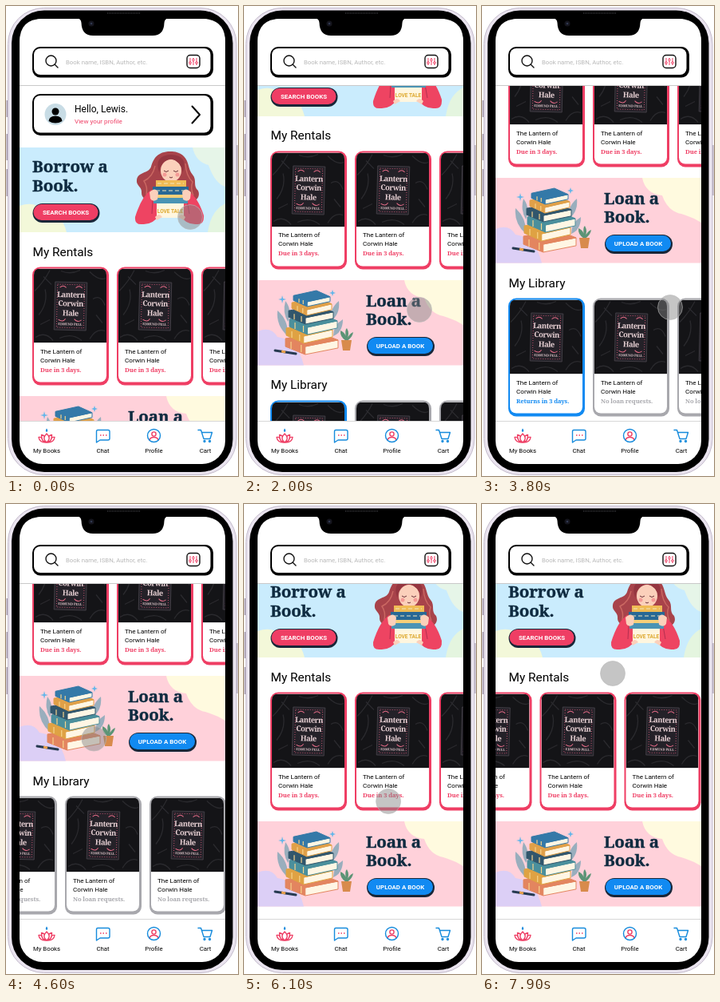
These frames come from a looping animation (291 by 588 pixels, 8 s). An HTML page:

```html
<!DOCTYPE html>
<html lang="en">
<head>
<meta charset="utf-8">
<title>Book rental app</title>
<style>
html, body { margin: 0; width: 100%; height: 100%; overflow: hidden; background: #fff; }
svg { display: block; width: 291px; height: 588px; font-family: Roboto, sans-serif; }
.display { font-family: "Noto Serif", serif; font-weight: 900; }
.title { font-size: 20.5px; fill: #0f2b40; stroke: #0f2b40; stroke-width: .4; letter-spacing: -.1px; }
.head { font-size: 15.4px; }
.small { font-size: 8.1px; }
.due { font-size: 7.6px; letter-spacing: -.1px; }
.button { font-size: 7.9px; font-weight: 700; fill: #fff; text-anchor: middle; }
.nav { font-size: 7.8px; text-anchor: middle; }
.line { fill: none; stroke-width: 1.4; stroke-linecap: round; stroke-linejoin: round; }
</style>
</head>
<body>
<svg viewBox="0 0 291 588">
  <defs>
    <clipPath id="view"><path d="M17 99H275V520H17Z"/></clipPath>
    <clipPath id="photoClip"><path d="M2 95V10Q2 2 10 2H85Q93 2 93 10V95Z"/></clipPath>
    <g id="photo" clip-path="url(#photoClip)">
      <path d="M2 2H93V95H2Z" fill="#141417"/>
      <g fill="none" stroke="#55545a" stroke-width="1.3" opacity=".35">
        <path d="M3 30Q15 18 22 4M8 60Q20 45 16 28M4 88Q16 80 26 92M72 6Q84 18 92 14M76 40Q86 34 91 48M72 90Q80 76 91 80M36 5Q48 10 60 4M34 89Q50 82 62 92"/>
        <path d="M14 12L24 22M80 60L88 70M10 72L22 66"/>
      </g>
      <g transform="rotate(1.5 48 49)" text-anchor="middle" class="display">
        <path d="M28 19H68V79H28Z" fill="#242128" stroke="#4b474f" stroke-width=".8"/>
        <path d="M31 22H65V76H31Z" fill="none" stroke="#b7506a" stroke-width="1" stroke-dasharray="1 2"/>
        <path d="M34 26q4-4 8 0M54 26q4-4 8 0M33 66q6 4 9-1M53 65q4 5 9 1" fill="none" stroke="#e36a86"/>
        <g fill="#ead3d6" font-size="9.4" letter-spacing="-.5">
          <text x="48" y="38">Lantern</text><text x="48" y="49">Corwin</text><text x="48" y="61">Hale</text>
        </g>
        <text x="48" y="73" font-size="4" fill="#ead3d6">EDMUND PELL</text>
      </g>
    </g>
  </defs>

  <path d="M1.500 118V139M1.500 160V193M1.500 204V238M289.500 174V237" stroke="#a79db0" stroke-width="2"/>
  <rect x="2.500" y="2.500" width="286.500" height="584" rx="45" fill="#eae4ef" stroke="#c3bacb"/>
  <rect x="7" y="5.500" width="277.500" height="577.500" rx="41"/>
  <rect x="17" y="16" width="258" height="557" rx="29" fill="#fff"/>

  <g clip-path="url(#view)">
    <g id="page">
      <g id="profile"></g>
      <g>
        <path d="M17 177H275V283H17Z" fill="#caecfd"/>
        <path d="M234 177Q238 195 254 199Q262 222 275 226V177Z" fill="#e6f5e8"/>
        <path d="M17 250Q37 243 47 257Q70 258 76 283H17Z" fill="#f3f8d9"/>
        <path d="M275 247Q257 256 253 283H275Z" fill="#e4f5df"/>
        <text class="display title" x="33" y="208">Borrow a</text>
        <text class="display title" x="33" y="232">Book.</text>
        <g id="search"></g>
        <g id="reader">
          <path d="M206 182C190 182 185 191 182 201C179 210 165 207 164 218C163 225 171 226 170 234C170 242 180 245 190 244H224C236 248 245 240 241 231C234 225 240 218 234 211C228 204 230 195 223 188C218 183 212 182 206 182Z" fill="#a8434a"/>
          <path d="M187 200Q184 214 173 219Q178 226 176 236M225 197Q226 213 234 220Q231 228 235 237" fill="none" stroke="#cb6862" stroke-width="1.4"/>
          <path d="M182 230Q170 238 162 264Q161 274 171 273Q184 274 193 261L191 235ZM226 230Q240 237 248 262Q249 274 239 273Q226 274 217 261L219 235Z" fill="#ee4462"/>
          <path d="M184 243L183 260M227 243L230 260" stroke="#b42f50"/>
          <ellipse cx="207" cy="206" rx="13" ry="14" fill="#fbd0bb"/>
          <path d="M192 208Q194 194 207 191Q219 194 222 208Q229 187 207 186Q185 187 192 208" fill="#943640"/>
          <path d="M198 206q3 3 6 0M210 206q3 3 6 0M205 214q2 2 4 0" fill="none" stroke="#693038"/>
          <circle cx="199" cy="211" r="2.500" fill="#f49b97"/><circle cx="215" cy="211" r="2.500" fill="#f49b97"/>
          <path d="M188 218H226V226H188Z" fill="#f0bb55"/>
          <path d="M184 226H229V236H184Z" fill="#286895"/>
          <path d="M188 236H226V240H188Z" fill="#f5cf78"/>
          <path d="M185 240H228V247H185Z" fill="#4a94b4"/>
          <path d="M189 247H223V265H189Z" fill="#fff6df"/>
          <path d="M190 222H223M188 231H226" stroke="#f1e6bd" stroke-dasharray="5 3"/>
          <text x="206" y="259" font-size="6.500" font-weight="700" fill="#dda82e" text-anchor="middle">LOVE TALE</text>
          <path d="M180 233q7-7 11 0l-1 9q-6 4-9-1M232 233q-7-7-11 0l1 9q6 4 9-1M187 264q5-6 9 0l-7 4M225 264q-5-6-9 0l7 4" fill="#fbd0bb"/>
        </g>
      </g>
      <text class="head" x="33.500" y="312.500">My Rentals</text>
      <g id="rentals"></g>
      <g>
        <path d="M17 488H275V594.500H17Z" fill="#ffd1da"/>
        <path d="M201 488Q205 508 226 510Q233 530 250 533Q264 537 275 544V488Z" fill="#fffadf"/>
        <path d="M17 552Q34 545 42 559Q67 562 75 594.500H17Z" fill="#dccff6"/>
        <path d="M55 558Q40 545 42 526Q56 538 55 558M55 540Q48 528 52 514Q61 526 55 540M108 540Q107 524 119 514Q121 531 108 540M112 558Q112 544 124 537Q124 553 112 558" fill="#99aebd"/>
        <path d="M48 507l1 4 4 1-4 1-1 4-1-4-4-1 4-1ZM111 500l1 3 3 1-3 1-1 3-1-3-3-1 3-1Z" fill="#63b6ea"/>
        <g id="stack"></g>
        <path d="M39 576L65 580" stroke="#263a50" stroke-width="3" stroke-linecap="round"/>
        <path d="M47 577l5 1" stroke="#e8a04c" stroke-width="3"/>
        <path d="M128 564Q120 559 121 551Q128 554 128 561Q126 550 129 548Q133 555 129 562Q132 555 137 553Q136 560 129 564Z" fill="#5c9476"/>
        <path d="M122 563H135L133 576H124Z" fill="#d88b4c"/>
        <text class="display title" x="153" y="521">Loan a</text>
        <text class="display title" x="153" y="544">Book.</text>
        <g id="upload"></g>
      </g>
      <text class="head" x="33.500" y="624.500">My Library</text>
      <g id="library"></g>
    </g>
    <circle id="touch" r="15.500" fill="#858585" fill-opacity=".48" stroke="#bbb" stroke-opacity=".6"/>
  </g>

  <g id="header"></g>
  <path d="M17 99.500H275" stroke="#c9c9c9"/>
  <path d="M90 15.500Q94 16 94.500 21Q95 37 109 37H184Q198 37 198.500 21Q199 16 203 15.500Z"/>
  <circle cx="107" cy="22" r="3.500" fill="#15151d"/><circle cx="107" cy="22" r="1.300" fill="#303850"/>
  <path d="M127 9H168" stroke="#29292c" stroke-width="2" stroke-dasharray="1 1"/>

  <path d="M17 519.500H275" stroke="#d7d7d7"/>
  <g class="line" stroke="#ee3e64">
    <path d="M51 546Q44.500 541 51 535Q57.500 541 51 546Q44 545 44.500 536.500Q47 537 48.500 538.500M51 546Q58 545 57.500 536.500Q55 537 53.500 538.500M51 546Q42 546.500 41 539.500Q43 539 45 540M51 546Q60 546.500 61 539.500Q59 539 57 540"/>
    <circle cx="185.500" cy="535.500" r="2.600"/><path d="M180 543Q181 539.500 185.500 539.500Q190 539.500 191 543"/>
  </g>
  <path d="M51 528.500Q48.500 532 51 533Q53.500 532 51 528.500Z" fill="#168bdc"/>
  <g class="line" stroke="#168bdc">
    <path d="M115 530.500H128Q130 530.500 130 532.500V541Q130 543 128 543H118L113.500 546V532.500Q113.500 530.500 115 530.500Z"/>
    <circle cx="185.500" cy="537.500" r="8"/>
    <path d="M241 530.500H244.500L248 541.500H256L258.500 533.500H246"/>
    <circle cx="249" cy="544.500" r="1"/><circle cx="255.500" cy="544.500" r="1"/>
  </g>
  <path d="M118 537h1.500m2 0h1.500m2 0h1.500" stroke="#ee3e64" stroke-width="1.600"/>
  <g class="nav">
    <text x="51" y="559">My Books</text><text x="121.500" y="559">Chat</text>
    <text x="185.500" y="559">Profile</text><text x="250" y="559">Cart</text>
  </g>
</svg>
<script>
const RED = '#ef3e64', BLUE = '#118af2', GRAY = '#a8a8ad';
const $ = id => document.getElementById(id);

const panel = (y, h) => `
  <rect x="33" y="${y}" width="227" height="${h}" rx="10"/>
  <rect x="35" y="${y + 2}" width="221.500" height="${h - 5.5}" rx="8" fill="#fff"/>`;

const pill = (x, y, w, color, label) => `
  <rect x="${x}" y="${y}" width="${w}" height="24" rx="12" fill="#182638"/>
  <rect x="${x + 1}" y="${y + 1}" width="${w - 3}" height="20" rx="10" fill="${color}"/>
  <text class="button" x="${x + w / 2 - .5}" y="${y + 14}">${label}</text>`;

const card = (x, y, color, note) => `
  <g transform="translate(${x} ${y})">
    <rect width="96" height="148" rx="10" fill="${color}"/>
    <rect x="2" y="2" width="91" height="142" rx="8" fill="#fff"/>
    <use href="#photo"/>
    <text class="small" x="10" y="108">The Lantern of</text>
    <text class="small" x="10" y="119">Corwin Hale</text>
    <text class="display due" x="10" y="131" fill="${color}">${note}</text>
  </g>`;

const row = (y, first, others) => first + [139, 245, 351].map(x => card(x, y, ...others)).join('');

// A book lying flat: cover on top, spine on the left, page edges on the right
function book(x, y, w, d, h, color) {
  const L = [x - w, y - .1 * d], F = [x - .25 * w, y + d];
  const B = [x + .25 * w, y - d], R = [x + w, y + .1 * d];
  const down = p => [p[0], p[1] + h];
  const face = (pts, fill) => `<polygon points="${pts.join(' ')}" fill="${fill}" stroke="${color}" stroke-linejoin="round"/>`;
  return face([L, F, down(F), down(L)], color) + face([F, R, down(R), down(F)], '#fff6e4') +
    face([L, B, R, F], color) +
    `<path d="M${L[0] + 7} ${L[1] + 4}v${h - 1}M${F[0] - 5} ${F[1] - 2}v${h - 1}" stroke="#f6d38b" stroke-width="1.200"/>`;
}

$('header').innerHTML = '<path d="M17 99V45Q17 16 46 16H246Q275 16 275 45V99Z" fill="#fff"/>' + panel(51, 38.5) + `
  <g class="line" stroke="#111"><circle cx="56.500" cy="68.500" r="6.500"/><path d="M61.500 73.500L65 77"/>
  <rect x="227" y="61.500" width="16" height="16" rx="4"/></g>
  <text x="75" y="72.500" font-size="7.800" fill="#b8b8b8">Book name, ISBN, Author, etc.</text>
  <path d="M231 65V74M235 65V74M239 65V74" stroke="${RED}"/>
  <g fill="#fff" stroke="${RED}"><circle cx="231" cy="71" r="1.300"/><circle cx="235" cy="67.500" r="1.300"/><circle cx="239" cy="71" r="1.300"/></g>`;
$('profile').innerHTML = panel(110, 52) + `
  <circle cx="62" cy="135.500" r="13.500" fill="#c8dce5"/>
  <circle cx="62" cy="132" r="4.500"/><path d="M53.500 144Q54 137.500 62 137.500Q70 137.500 70.500 144Q62 149 53.500 144Z"/>
  <text x="86" y="133" font-size="12">Hello, Lewis.</text>
  <text class="small" x="86" y="147" fill="${RED}">View your profile</text>
  <path class="line" d="M233.500 125.500L243 136L233.500 146.500" stroke="#000" style="stroke-width:2"/>`;
$('search').innerHTML = pill(33.5, 247, 84, RED, 'SEARCH BOOKS');
$('upload').innerHTML = pill(154, 559, 85, BLUE, 'UPLOAD A BOOK');
$('stack').innerHTML = [
  [85, 562, 33, 9, 10, '#e3855f'], [82, 549, 29, 9, 9, '#dfa243'], [87, 538, 30, 9, 9, '#4a8f9c'],
  [84, 527, 28, 8, 8, '#31566c'], [85, 517, 25, 8, 7, '#e0a048'], [85, 508, 23, 7, 6, '#3479a8']
].map(b => book(...b)).join('');
$('rentals').innerHTML = row(326.5, card(33, 326.5, RED, 'Due in 3 days.'), [RED, 'Due in 3 days.']);
$('library').innerHTML = row(638.5, card(33, 638.5, BLUE, 'Returns in 3 days.'), [GRAY, 'No loan requests.']);

// Smooth path through [time, value] points, at rest on peaks and plateaus
function track(...keys) {
  const slope = i => {
    const a = keys[i - 1], b = keys[i], c = keys[i + 1];
    if (!a || !c || (b[1] - a[1]) * (c[1] - b[1]) <= 0) return 0;
    return (c[1] - a[1]) / (c[0] - a[0]);
  };
  return t => {
    const i = keys.findIndex(k => k[0] > t);
    if (i < 0) return keys[keys.length - 1][1];
    if (!i) return keys[0][1];
    const [t0, v0] = keys[i - 1], [t1, v1] = keys[i];
    const d = t1 - t0, u = (t - t0) / d, e = u * u * (3 - 2 * u);
    return v0 + (v1 - v0) * e + d * u * (1 - u) * (slope(i - 1) * (1 - u) - slope(i) * u);
  };
}

const scroll = track([100, 0], [700, 105], [1300, 145], [2000, 145], [2450, 235], [2800, 303], [2900, 305],
  [3000, 305], [3400, 273], [4800, 273], [5300, 163], [5600, 112], [5950, 91]);
const librarySlide = track([3850, 0], [4500, 171]);
const rentalSlide = track([6450, 0], [7200, 172.5]);
const touchX = track([0, 231], [700, 226], [1900, 220], [2000, 220], [2800, 203], [2900, 202], [3000, 202],
  [3700, 236], [3850, 236], [4400, 75], [4800, 155], [5300, 165], [5800, 176], [6100, 181],
  [6350, 232], [6450, 232], [7100, 65], [7900, 164]);
const touchY = track([0, 264], [100, 264], [700, 150], [1000, 150], [1800, 380], [2000, 380], [2800, 190],
  [2900, 188], [3000, 188], [3700, 377], [3900, 377], [4400, 370], [4800, 234], [5300, 344],
  [5600, 395], [5800, 395], [6100, 372], [6400, 368], [7150, 362], [7900, 212]);

const move = (id, x, y) => $(id).setAttribute('transform', `translate(${x} ${y})`);
const start = performance.now();
function draw() {
  const t = (performance.now() - start) % 8000;
  move('page', 0, -scroll(t));
  move('library', -librarySlide(t), 0);
  move('rentals', -rentalSlide(t), 0);
  move('touch', touchX(t), touchY(t));
  requestAnimationFrame(draw);
}
draw();
</script>
</body>
</html>
```
